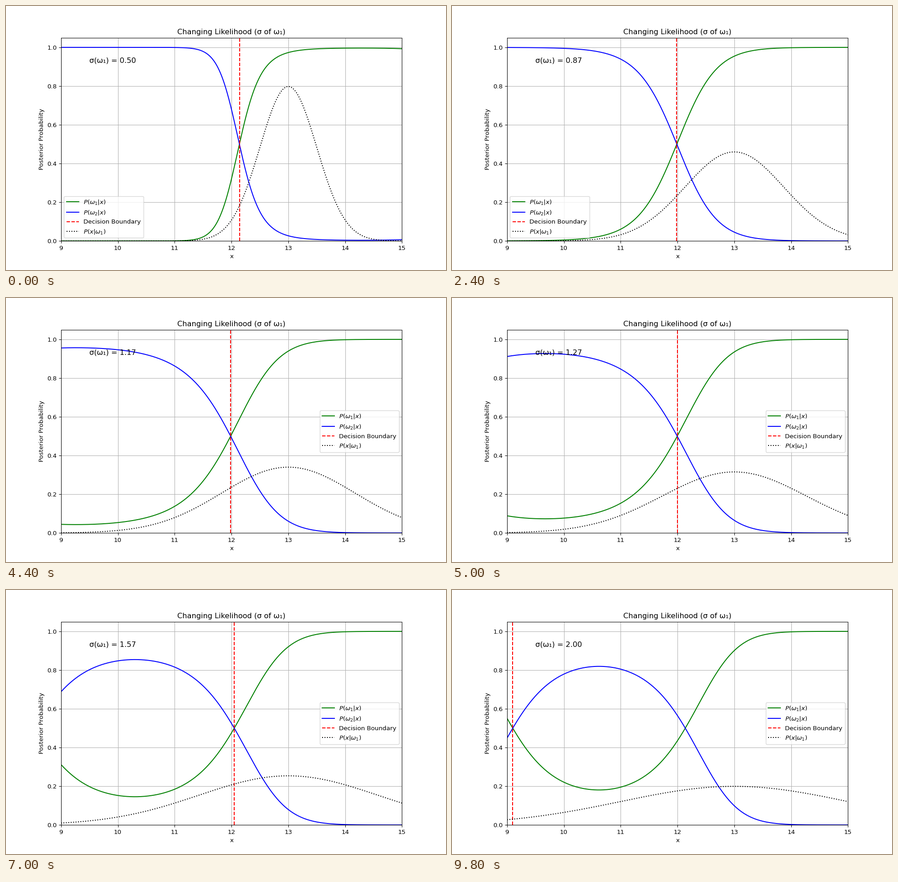
These frames come from a looping animation (966 px wide and 580 px high, 10000 ms). A matplotlib script:

```python
import numpy as np
import matplotlib.pyplot as plt
from matplotlib.animation import FuncAnimation

DPI = 96.6
FRAMES = 50
INTERVAL = 200

MEAN_1, MEAN_2, SIGMA_2 = 13, 11, 0.8
x = np.linspace(9, 15, 1000)
sigmas = np.linspace(0.5, 2.0, FRAMES)


def gauss(x, mean, sigma):
    return np.exp(-0.5 * ((x - mean) / sigma) ** 2) / (sigma * np.sqrt(2 * np.pi))


# The small excess keeps the pixel height from being truncated to 579.
fig, ax = plt.subplots(figsize=(10, 580.01 / DPI), dpi=DPI)
ax.set_xlim(9, 15)
ax.set_ylim(0, 1.05)
ax.set_title("Changing Likelihood (σ of ω₁)")
ax.set_xlabel("x")
ax.set_ylabel("Posterior Probability")
ax.grid(True)

post_1, = ax.plot(x, 0 * x, color="green", label=r"$P(\omega_1|x)$")
post_2, = ax.plot(x, 0 * x, color="blue", label=r"$P(\omega_2|x)$")
boundary = ax.axvline(12, color="red", linestyle="--", label="Decision Boundary")
density, = ax.plot(x, 0 * x, color="black", linestyle=":", label=r"$P(x|\omega_1)$")
readout = ax.text(9.5, 0.92, "", fontsize=12)
ax.legend(loc="best")


def update(i):
    sigma = sigmas[i]
    like_1 = gauss(x, MEAN_1, sigma)
    like_2 = gauss(x, MEAN_2, SIGMA_2)
    p1 = like_1 / (like_1 + like_2)
    p2 = 1 - p1
    cut = x[np.argmin(np.abs(p1 - p2))]

    post_1.set_ydata(p1)
    post_2.set_ydata(p2)
    density.set_ydata(like_1)
    boundary.set_xdata([cut, cut])
    readout.set_text(f"σ(ω₁) = {sigma:.2f}")
    return post_1, post_2, density, boundary, readout


def init():
    return update(0)


anim = FuncAnimation(fig, update, frames=FRAMES, init_func=init,
                     interval=INTERVAL, repeat=True, blit=False)
plt.show()
```
